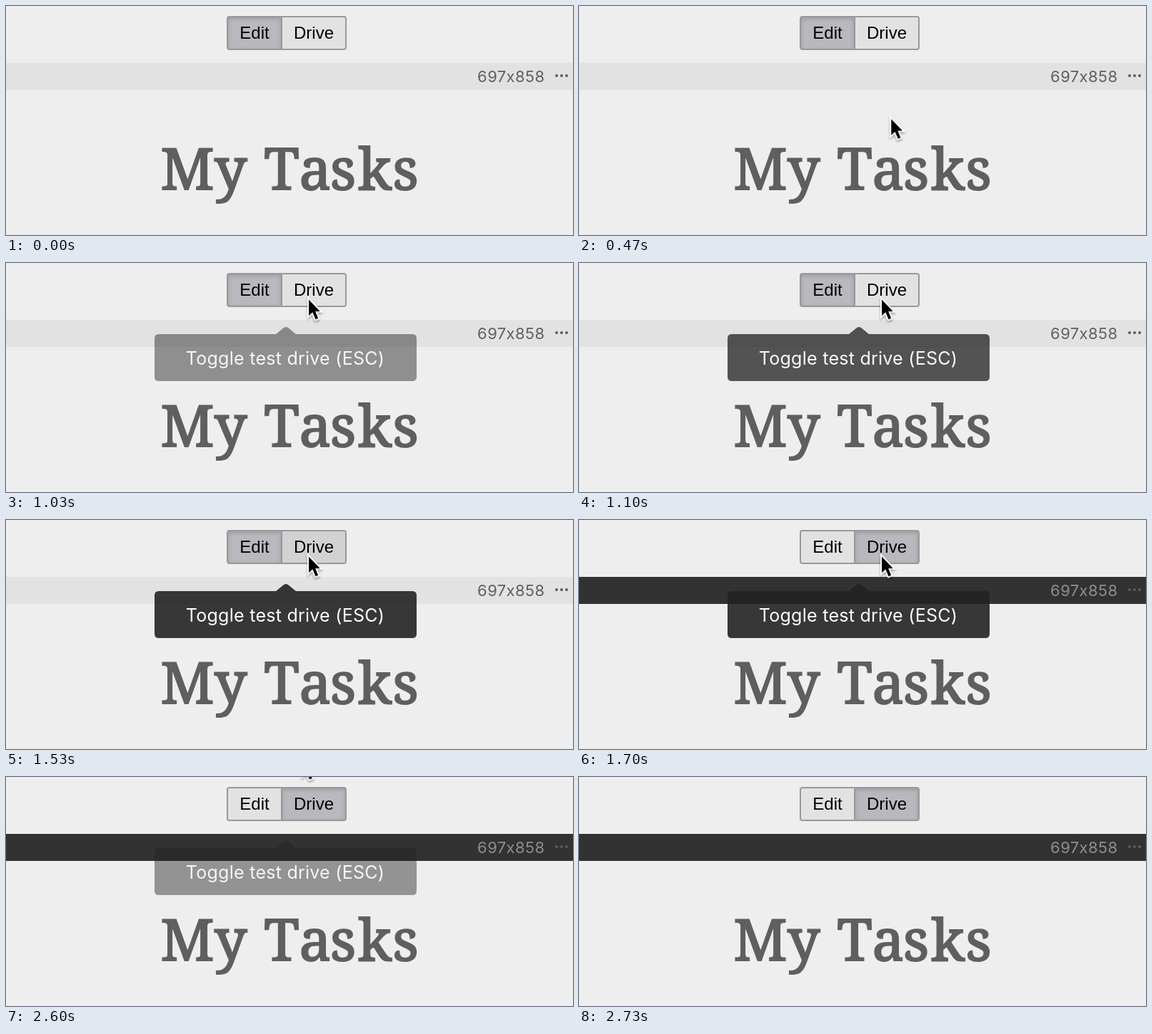
An HTML page for the animation above (2.87 s loop, 794x322 px).

```html
<!DOCTYPE html>
<html lang="en">
<head>
<meta charset="utf-8">
<title>Test drive toggle</title>
<style>
  html, body { margin: 0; width: 100%; height: 100%; overflow: hidden; background: #eee; }
  svg, .toggle { position: absolute; }
  svg { left: 0; top: 0; display: block; }

  /* Every animation shares one 2870 ms clock; states switch hard unless a keyframe says otherwise. */
  .anim { animation: 2870ms step-end infinite; }

  .toggle {
    left: 309px; top: 14px; width: 168px; height: 48px; box-sizing: border-box; overflow: hidden;
    display: grid; grid-template-columns: 74px 88px; gap: 2px;
    border: 2px solid #999; border-radius: 4px; background: #999;
    font: 24px/44px "Liberation Sans", Arial, sans-serif; color: #000; text-align: center;
  }
  .edit { animation-name: edit; }
  .drive { animation-name: drive; }
  @keyframes edit {
    0% { background: #b9b8be; box-shadow: inset 0 2px 4px 1px rgba(90, 90, 100, .25); }
    59.23%, 100% { background: #e2e2e2; box-shadow: none; }
  }
  @keyframes drive {
    0% { background: #e2e2e2; box-shadow: none; }
    53.3% { background: #d2d2d2; box-shadow: none; }
    59.23%, 100% { background: #b9b8be; box-shadow: inset 0 2px 4px 1px rgba(90, 90, 100, .25); }
  }

  .bar { animation-name: bar; }
  .size { animation-name: size; font: 22px Inter, sans-serif; letter-spacing: .4px; }
  .dots { animation-name: dots; }
  @keyframes bar { 0% { fill: #e2e2e2; } 59.23%, 100% { fill: #323232; } }
  @keyframes size { 0% { fill: #606060; } 59.23%, 100% { fill: #8e8e8e; } }
  @keyframes dots { 0% { fill: #5c5c5c; } 59.23%, 100% { fill: #5c5c5c; } }

  .title {
    font: 80px "Noto Serif", serif;
    fill: #5f5f5f; stroke: #5f5f5f; stroke-width: 2.2;
  }

  .tip { animation-name: tip; font: 25px Inter, sans-serif; letter-spacing: .27px; }
  @keyframes tip {
    0% { opacity: 0; }
    34.84% { opacity: .25; }
    35.88% { opacity: .466; }
    37.28% { opacity: .63; }
    38.32% { opacity: .76; }
    39.37% { opacity: .85; }
    40.76% { opacity: .9; }
    89.54% { opacity: .66; }
    90.59% { opacity: .45; }
    91.63% { opacity: .28; }
    93.03% { opacity: .14; }
    94.07% { opacity: .05; }
    95.12%, 100% { opacity: 0; }
  }

  .cursor {
    animation-name: cursor;
    fill: #000; stroke: #fff; stroke-width: 3.8; paint-order: stroke;
    filter: drop-shadow(0 2px 1.5px rgba(0, 0, 0, .35));
  }
  @keyframes cursor {
    0% { transform: translate(456px, 400px); }
    11.49% { transform: translate(456px, 311px); animation-timing-function: cubic-bezier(.25, .35, .35, 1); }
    26.82% { transform: translate(424px, 51.5px); }
    82.57% { transform: translate(423px, 51.5px); animation-timing-function: cubic-bezier(.4, 0, .8, .7); }
    91.63%, 100% { transform: translate(414px, -40px); }
  }
</style>
</head>
<body>
<div class="toggle">
  <div class="anim edit">Edit</div>
  <div class="anim drive">Drive</div>
</div>
<svg width="794" height="322" viewBox="0 0 794 322">
  <rect class="anim bar" y="80" width="794" height="38"/>
  <text class="anim size" x="754.5" y="107" text-anchor="end">697x858</text>
  <g class="anim dots">
    <circle cx="771" cy="98" r="2"/>
    <circle cx="778" cy="98" r="2"/>
    <circle cx="785" cy="98" r="2"/>
  </g>

  <text class="title" y="257.5" x="216.5 292 330 361.5 410.5 454 493 541.5">My Tasks</text>

  <g class="anim tip">
    <path fill="#222" d="M214 100H378L389 91Q392 89 395 91L406 100H569Q575 100 575 106V160Q575 166 569 166H214Q208 166 208 160V106Q208 100 214 100Z"/>
    <text x="391" y="143" text-anchor="middle" fill="#fff">Toggle test drive (ESC)</text>
  </g>

  <path class="anim cursor" d="M0 0V22.8L5.3 17.8L9.5 27.8L13.2 26.2L9.1 16.4H15.8Z"/>
</svg>
</body>
</html>
```
